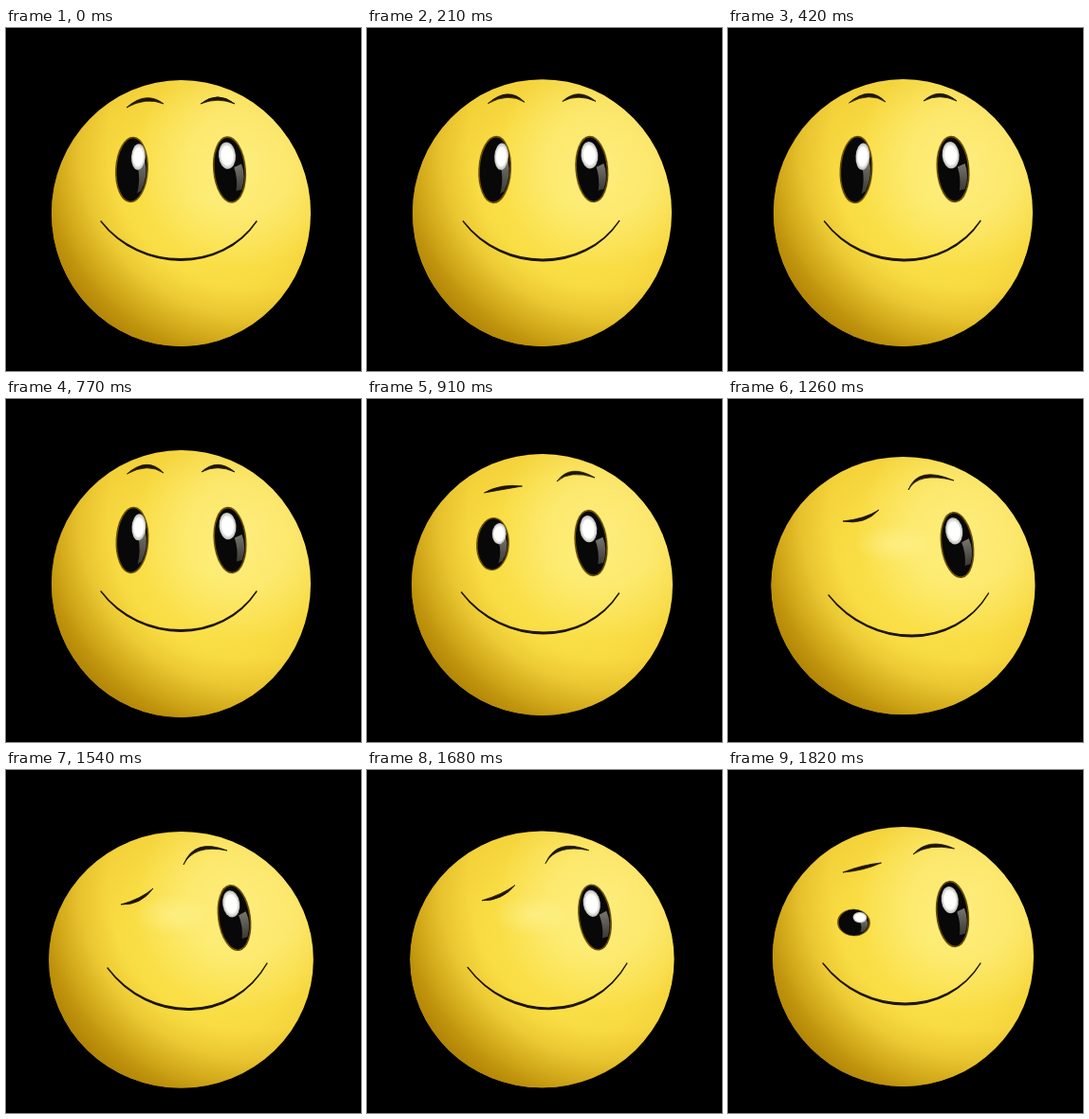
These frames come from a looping animation (374 px wide and 362 px high, 1890 ms). An HTML page:

```html
<!DOCTYPE html>
<html lang="en">
<head>
<meta charset="utf-8">
<title>Winking smiley</title>
<style>
html, body { margin: 0; width: 100%; height: 100%; overflow: hidden; background: #000; }
svg { display: block; width: 374px; height: 362px; }
#head { filter: blur(.55px); }
</style>
</head>
<body>
<svg viewBox="0 0 374 362">
  <defs>
    <radialGradient id="skin" gradientUnits="userSpaceOnUse" cx="215" cy="180" r="185">
      <stop offset="0" stop-color="#fce552"/>
      <stop offset=".5" stop-color="#f9dc43"/>
      <stop offset=".8" stop-color="#f2cf38"/>
      <stop offset="1" stop-color="#e6bd2c"/>
    </radialGradient>
    <radialGradient id="shade" gradientUnits="userSpaceOnUse" cx="262" cy="120" r="250">
      <stop offset=".62" stop-color="#b88a00" stop-opacity="0"/>
      <stop offset=".74" stop-color="#b88a00" stop-opacity=".18"/>
      <stop offset=".82" stop-color="#b88a00" stop-opacity=".45"/>
      <stop offset=".92" stop-color="#b08200" stop-opacity=".75"/>
      <stop offset="1" stop-color="#a87a00" stop-opacity=".88"/>
    </radialGradient>
    <radialGradient id="light" gradientUnits="userSpaceOnUse" cx="250" cy="140" r="115">
      <stop offset="0" stop-color="#fff59c" stop-opacity=".6"/>
      <stop offset=".5" stop-color="#fff59c" stop-opacity=".45"/>
      <stop offset="1" stop-color="#fff59c" stop-opacity="0"/>
    </radialGradient>
    <radialGradient id="lid">
      <stop offset="0" stop-color="#fff59c" stop-opacity=".5"/>
      <stop offset="1" stop-color="#fff59c" stop-opacity="0"/>
    </radialGradient>
    <linearGradient id="gloss" x1="0" y1="0" x2="0" y2="1">
      <stop offset="0" stop-color="#77756c"/>
      <stop offset="1" stop-color="#3a3936"/>
    </linearGradient>
    <radialGradient id="glint">
      <stop offset=".65" stop-color="#fff"/>
      <stop offset="1" stop-color="#b8b8b4"/>
    </radialGradient>
  </defs>
  <g id="head">
    <ellipse class="body" fill="url(#skin)"/>
    <ellipse class="body" fill="url(#shade)"/>
    <ellipse class="body" fill="url(#light)"/>
    <ellipse id="closed" cx="176" cy="153" rx="42" ry="22" fill="url(#lid)"/>
    <g id="eyeL">
      <ellipse rx="16.6" ry="34.5" fill="#080808" stroke="#6e5208" stroke-width="1.6"/>
      <path d="M6-4L13-11Q18 6 11 22L7 25Q10 10 6-4Z" fill="url(#gloss)"/>
      <ellipse cx="6.2" cy="-14" rx="7.4" ry="14" fill="url(#glint)"/>
    </g>
    <g id="eyeR">
      <ellipse rx="16.6" ry="34.5" fill="#080808" stroke="#6e5208" stroke-width="1.6"/>
      <path d="M5-2L13-5Q17 8 11 22L5 23Q8 11 5-2Z" fill="url(#gloss)"/>
      <ellipse cx="-1.2" cy="-15" rx="9" ry="14.2" fill="url(#glint)"/>
    </g>
    <g fill="#1d1400" stroke="#1d1400" stroke-width=".8" stroke-linejoin="round">
      <path id="browL"/>
      <path id="browR"/>
      <path id="mouth" stroke-width="1.4"/>
    </g>
  </g>
</svg>
<script>
const LOOP = 1890, STEP = 70, EYE = 34.5;

// body: half width, top, bottom; eyeL: x, y, half height (below zero: shut); eyeR: x, y, tilt
// brows and mouth: start, middle, end points
const rest = {
  body: [136.5, 55, 336], eyeL: [132.5, 149.5, 34], eyeR: [235.5, 149.5, -5],
  browL: [127, 84, 147, 75.5, 166, 80], browR: [205, 80, 223, 74.5, 241, 80],
  mouth: [100, 204, 184, 244.5, 264, 204]
};
const lifted = {
  body: [136.5, 54, 336], eyeL: [135, 149.5, 35], eyeR: [237, 149, -4.5],
  browL: [127.5, 79, 148, 71, 166, 78], browR: [206, 77, 223, 71, 241, 77],
  mouth: [101.5, 204, 185.5, 245, 266, 203.5]
};
const settled = {
  ...lifted, eyeL: [133, 149, 34.5], eyeR: [236, 149, -5],
  mouth: [100, 203, 184, 244.5, 264, 203]
};
const squint = {
  body: [137.5, 58, 334], eyeL: [132.5, 153, 27.5], eyeR: [236, 152, -6],
  browL: [123.5, 99, 142, 94, 163.5, 92], browR: [200, 87, 217, 78, 240, 83],
  mouth: [99.5, 204, 185.5, 247, 265.5, 205]
};
const narrow = {
  body: [137.5, 60, 334], eyeL: [132.5, 161, 14], eyeR: [236.5, 152, -6],
  browL: [121, 108, 142, 103, 161.5, 98], browR: [195, 89, 214, 80, 238.5, 83],
  mouth: [100, 204, 186.5, 247, 266, 204]
};
const wink = {
  body: [139, 61, 333], eyeL: [132, 165, -20], eyeR: [241.5, 154, -8],
  browL: [121, 129, 142, 126.5, 159, 117], browR: [190, 96, 207, 82, 238, 86],
  mouth: [106, 207, 194, 250, 274.5, 205]
};
const deep = {
  body: [139.3, 65, 335.5], eyeL: [132, 165, -32], eyeR: [240.5, 156, -8],
  browL: [121, 142, 140, 136.5, 155, 125], browR: [187, 100, 204, 83.5, 233, 85],
  mouth: [107, 209, 194, 252.5, 275, 204]
};

const easeIn = n => u => u ** n;
const easeOut = n => u => 1 - (1 - u) ** n;
const keys = [
  [0, rest, easeOut(3)], [420, lifted, easeIn(1)], [770, settled, easeIn(1.5)],
  [910, squint, easeOut(2)], [1260, wink, easeOut(1.5)], [1540, deep, easeIn(3)],
  [1820, narrow, easeIn(1)], [LOOP, rest]
];

const $ = id => document.getElementById(id);
const set = (el, attrs) => Object.entries(attrs).forEach(([k, v]) => el.setAttribute(k, v));

function poseAt(t) {
  const i = keys.findIndex((k, n) => t < keys[n + 1][0]);
  const [t0, a, ease] = keys[i], [t1, b] = keys[i + 1];
  const u = ease((t - t0) / (t1 - t0));
  return Object.fromEntries(Object.keys(a).map(part =>
    [part, a[part].map((v, n) => v + (b[part][n] - v) * u)]));
}

// A curved stroke that swells in the middle
function brow([x1, y1, mx, my, x2, y2]) {
  const cx = 2 * mx - (x1 + x2) / 2, cy = 2 * my - (y1 + y2) / 2;
  return `M${x1} ${y1}Q${cx} ${cy - 3.4} ${x2} ${y2}Q${cx} ${cy + 3.4} ${x1} ${y1}Z`;
}

function smile([x1, y1, mx, my, x2, y2]) {
  const cx = (8 * mx - x1 - x2) / 6, cy = (8 * my - y1 - y2) / 6;
  const w = (x2 - x1) * .26, l = cx - w, r = cx + w;
  return `M${x1} ${y1}C${l} ${cy - 1} ${r} ${cy - 1} ${x2} ${y2}` +
    `C${r} ${cy + 1} ${l} ${cy + 1} ${x1} ${y1}Z`;
}

function draw(t) {
  const p = poseAt(t);
  const [rx, top, bottom] = p.body, [lx, ly, open] = p.eyeL, [ex, ey, tilt] = p.eyeR;
  document.querySelectorAll('.body').forEach(el =>
    set(el, { cx: 184.5, cy: (top + bottom) / 2, rx, ry: (bottom - top) / 2 }));
  set($('eyeL'), {
    transform: `translate(${lx} ${ly}) rotate(3) scale(1 ${Math.max(open, 0) / EYE})`,
    display: open > 1 ? 'inline' : 'none'
  });
  set($('eyeR'), { transform: `translate(${ex} ${ey}) rotate(${tilt})` });
  set($('closed'), { opacity: Math.min(1, Math.max(0, -open / 20)) });
  set($('browL'), { d: brow(p.browL) });
  set($('browR'), { d: brow(p.browR) });
  set($('mouth'), { d: smile(p.mouth) });
}

const start = performance.now();
function tick(now) {
  const t = Math.max(0, now - start) % LOOP;
  draw(Math.floor(t / STEP) * STEP);
  requestAnimationFrame(tick);
}
draw(0);
requestAnimationFrame(tick);
</script>
</body>
</html>
```
